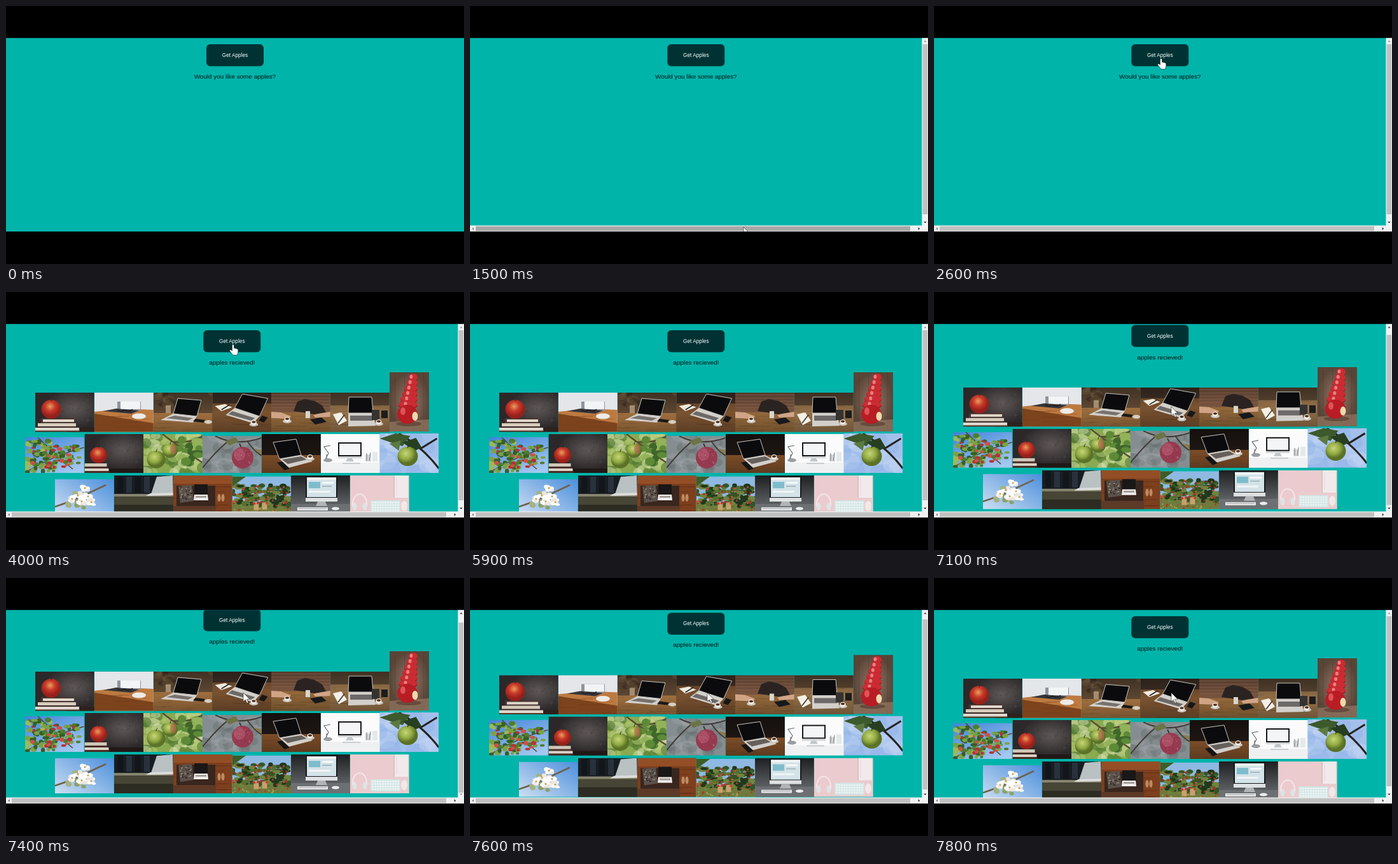
These frames come from a looping animation (720 px wide and 405 px high, 8 s). An HTML page:

```html
<!DOCTYPE html>
<html lang="en">
<head>
<meta charset="utf-8">
<title>Get Apples</title>
<style>
html, body { margin: 0; width: 100%; height: 100%; overflow: hidden; background: #000; }
#stage { display: block; width: 100vw; height: 100vh; }
text { font-family: "Liberation Sans", Arial, sans-serif; text-anchor: middle; }
</style>
</head>
<body>
<svg id="stage" viewBox="0 0 720 405">
  <defs>
    <linearGradient id="shade" x2="0" y2="1"><stop stop-opacity=".3"/><stop offset=".5" stop-opacity="0"/><stop offset="1" stop-opacity=".25"/></linearGradient>
    <linearGradient id="sky" x2=".6" y2="1"><stop stop-color="#3f84d8"/><stop offset="1" stop-color="#a4c8f0"/></linearGradient>
    <linearGradient id="haze" x1="1" x2="0" y2="1"><stop stop-color="#4c8fdc"/><stop offset="1" stop-color="#d3e3f3"/></linearGradient>
    <linearGradient id="studio" x2="0" y2="1"><stop stop-color="#1d1f21"/><stop offset="1" stop-color="#74777a"/></linearGradient>
    <radialGradient id="wall" cx=".65" cy=".4"><stop stop-color="#5f5857"/><stop offset="1" stop-color="#2c2829"/></radialGradient>
    <radialGradient id="boards"><stop stop-color="#94796a"/><stop offset="1" stop-color="#594537"/></radialGradient>
    <radialGradient id="red" cx=".45" cy=".35"><stop stop-color="#e7a05a"/><stop offset=".5" stop-color="#c93a2b"/><stop offset="1" stop-color="#96201a"/></radialGradient>
    <radialGradient id="green" cx=".4" cy=".35"><stop stop-color="#c6d578"/><stop offset=".6" stop-color="#93ab43"/><stop offset="1" stop-color="#5b7228"/></radialGradient>
  </defs>
  <svg y="50.3" width="720" height="303.7" viewBox="0 50.3 720 303.7">
    <rect y="50" width="720" height="304" fill="#00b4aa"/>
    <g id="doc">
      <g id="head">
        <rect x="315" y="60" width="90" height="34.5" rx="6" fill="#003234"/>
        <text x="360" y="79.8" font-size="8.27" fill="#fff">Get Apples</text>
        <text id="status" x="360" y="113.7" font-size="9.92" fill="#001512"></text>
      </g>
      <g id="photos"></g>
    </g>
    <g id="bars">
      <path d="M710.4 50H720V354H0V344.5H710.4Z" fill="#f1f1f1"/>
      <rect id="vThumb" x="711.6" width="7.6" height="267" fill="#c1c1c1"/>
      <rect id="hThumb" x="9" y="345.7" width="683" height="7.6"/>
      <path id="up" d="M713.3 56.5L715.5 54L717.7 56.5Z"/>
      <path id="down" d="M713.3 338.5L715.5 341L717.7 338.5Z"/>
      <path d="M5.7 347.3L3.2 349.5L5.7 351.7Z" fill="#777"/>
      <path d="M704.7 347.3L707.2 349.5L704.7 351.7Z" fill="#333"/>
    </g>
    <g id="cursor" fill="#fff" stroke="#222" stroke-width=".6" stroke-linejoin="round">
      <path id="hand" d="M0 1.5Q1.5-.7 3 1.5V6L8 7.2Q9.8 7.8 9.4 12L8 17H1.5L-4 10.3Q-3.2 8-1 9.3L0 10.3Z"/>
      <path id="arrow" d="M0 0V14L3.3 11L5.8 16.5L8 15.5L5.6 10.3H10Z"/>
    </g>
  </svg>
</svg>
<script>
const $ = id => document.getElementById(id);

// Drawing helpers, all returning SVG markup
const box = (x, y, w, h, fill) => `<rect x="${x}" y="${y}" width="${w}" height="${h}" fill="${fill}"/>`;
const oval = (x, y, rx, ry, fill) => `<ellipse cx="${x}" cy="${y}" rx="${rx}" ry="${ry}" fill="${fill}"/>`;
const poly = (points, fill) => `<polygon points="${points}" fill="${fill}"/>`;
const line = (d, color, w) => `<path d="${d}" fill="none" stroke="${color}" stroke-width="${w}"/>`;
const back = fill => box(0, 0, 93, 62, fill);
const shade = back('url(#shade)');
const repeat = (n, part) => Array.from({length: n}, (_, i) => part(i)).join('');

let seed = 7;
const rnd = (min, max) => {
  seed = seed * 16807 % 2147483647;
  return +(min + seed / 2147483647 * (max - min)).toFixed(1);
};
const dots = (n, x, y, w, h, r, ...colors) => repeat(n, i =>
  oval(rnd(x, x + w), rnd(y, y + h), rnd(r * .6, r * 1.4), rnd(r * .5, r), colors[i % colors.length]));
const grain = (y, h, color) => repeat(9, () => box(rnd(-20, 70), rnd(y, y + h), rnd(15, 50), .6, color));
const apple = (x, y, r, skin) => oval(x, y, r, r * .95, `url(#${skin})`) +
  line(`M${x} ${y - r * .8}q0 -3 2 -5`, '#33261a', 1);
const cup = (x, y) => oval(x, y + 3, 7, 3, '#c9c4bc') + oval(x, y, 4.5, 4, '#f0ece6') + oval(x, y - 1, 3, 1.8, '#4a2d1c');
const laptop = (screen, keys) => poly(keys, '#d3d0cb') +
  `<polygon points="${screen}" fill="#0b0b0d" stroke="#c9c6c1" stroke-width="1"/>`;
const desk = (wall, wood, y) => back(wall) + box(0, y, 93, 62, wood) + grain(y, 62 - y, '#3a22144d') + shade;
const speckle = dots(40, 0, 0, 93, 50, 2, '#77707014', '#221c1c22');

// Each photo: left, top, height, content, width if not the usual one
const photos = [
  [46, 158, 61.5, back('url(#wall)') + speckle +
    box(50, 55, 43, 8, '#2e211d') + box(9, 40, 51, 8, '#4a3530') + box(12, 42, 49, 4, '#e0d8cb') +
    box(4, 48, 60, 6, '#d5cbbc') + box(4, 53, 61, 2, '#352522') + box(0, 55, 69, 5, '#e0d8cd') + box(0, 59.5, 70, 2, '#5a3024') +
    apple(25, 26, 15.5, 'red')],
  [139, 158, 61.5, back('#e4e6ea') + poly('0,30 45,25 93,27 93,62 0,62', '#bd7a40') + poly('0,33 93,48 93,62 0,62', '#7c431d') +
    grain(32, 28, '#5a2e1466') + box(36, 14, 37, 14, '#8d949a') + box(41, 14, 31, 12, '#f2f4f6') +
    poly('14,29 34,25 70,28 58,33', '#353538') + line('M36 26q5 7 11 1q7 5 13 -1', '#1b1b1f', 1.2) + oval(70, 37, 11, 4.5, '#eeeae6')],
  [232, 158, 61.5, desk('#5c4632', '#a0703f', 32) + dots(12, 0, 0, 93, 20, 7, '#806a4a44', '#20140c55') +
    box(19, 20, 8, 12, '#d0bc9c99') + laptop('38,9 75,12 68,37 31,33', '31,33 68,37 62,47 11,43') +
    poly('20,40 33,36 62,40 54,44', '#77726d') + poly('66,41 81,43 78,47 62,45', '#1a1817') + oval(86, 46, 6, 3, '#d5cec3')],
  [324.5, 158, 61.5, desk('#3f2f25', '#7a5230', 17) + poly('4,21 20,18 31,23 14,29', '#efeadf') + line('M14 27L27 19', '#222', 1.5) +
    laptop('47,2 87,9 74,37 35,24', '35,24 74,37 64,48 21,35') + poly('31,29 67,40 61,44 25,34', '#6d6966') +
    poly('78,36 87,39 81,47 73,44', '#171717') + cup(65, 47)],
  [417, 158, 61.5, desk('#7a5540', '#93693b', 31) + repeat(5, i => box(0, 3 + i * 5, 93, .7, '#b58b6c66')) +
    poly('35,29 41,14 53,10 68,13 80,20 86,31 68,34 50,31', '#2a2321') + poly('0,30 15,31 31,37 28,41 0,40', '#d0a384') +
    poly('93,30 75,33 66,35 69,39 93,38', '#d0a488') + poly('61,42 79,39 87,46 69,50', '#17191c') + box(54, 29, 7, 11, '#d9d5cb') + cup(25, 42)],
  [510, 158, 61.5, desk('#5a4531', '#937048', 20) + laptop('29,7 65,7 67,32 28,32', '28,32 67,32 71,52 28,53') +
    poly('31,36 65,36 67,44 31,44', '#6c6a68') + poly('4,34 17,31 26,44 13,51', '#f3efe6') + line('M12 48L22 35', '#29251f', 1.4) +
    box(65, 27, 12, 16, '#343332') + box(80, 28, 10, 12, '#1d1c1c') + cup(76, 46)],
  [603, 126, 93, box(0, 0, 62, 93, 'url(#boards)') + repeat(4, i => box(8 + i * 15, 0, .7, 93, '#49372c77')) +
    poly('0,78 62,74 62,93 0,93', '#a88a7088') + oval(30, 81, 20, 4, '#4a312a88') +
    repeat(6, i => oval(37 - i * 1.6, 9 + i * 8.5, 7 + i * 1.6, 7, '#951620') +
      oval(37 - i * 1.6, 8 + i * 8.5, 7 + i * 1.6, 6, '#cb2c33') + oval(34 - i * 1.8, 7 + i * 8.5, 2.5, 3, '#e9807f')) +
    oval(28, 66, 16, 15, '#b81d25') + oval(21, 61, 4, 6, '#df5358') + oval(40, 69, 4.5, 7, '#efd9ac'), 62],

  [30, 228, 56, back('url(#sky)') + line('M0 56Q40 30 93 16M20 0Q45 25 75 50', '#5b4230', 1.5) +
    dots(75, 2, 5, 45, 50, 4, '#4d7d2e', '#7ba345', '#365f26', '#9cb95c') + dots(40, 40, 12, 45, 32, 3.5, '#4d7d2e', '#7ba345', '#365f26') +
    dots(20, 10, 14, 70, 34, 3.4, '#b83239', '#cf5049')],
  [123.5, 223, 61, back('url(#wall)') + speckle + box(35, 54, 58, 8, '#211816') +
    box(0, 46, 35, 6, '#d0c6b7') + box(0, 51, 36, 3, '#4a302a') + box(0, 54, 38, 5, '#dcd3c6') + box(0, 58, 39, 3, '#4d2922') + apple(22, 33, 13.5, 'red')],
  [216, 223, 61, back('#8aa950') + dots(60, 0, 0, 93, 62, 9, '#b4c97288', '#4f782f99', '#dce5bb77') +
    line('M30 0Q58 22 93 45M45 12Q75 15 93 3', '#594b34', 2.5) + dots(22, 52, 5, 40, 42, 7, '#5d8a37', '#93b259', '#3f672a') +
    apple(42, 26, 12, 'green') + oval(47, 24, 5, 8, '#b9614f99') + apple(20, 40, 14.5, 'green')],
  [309, 226, 58, back('#858d90') + dots(30, 0, 0, 93, 58, 10, '#a8aeb044', '#5b656455') +
    line('M20 0Q52 17 93 3M58 12L64 24M70 8Q82 25 93 31M0 50Q20 25 38 10', '#403a37', 2) +
    poly('35,8 52,2 57,9 42,15', '#6c7448') + poly('80,20 93,22 93,30', '#8a7a4c') + oval(63, 34, 17, 17, '#963a50') + oval(58, 29, 9, 10, '#b9647988') +
    dots(40, 51, 22, 24, 25, .8, '#d7929a88', '#6d1e3888')],
  [402, 223, 61, desk('#1d1613', '#7d4e29', 33) + laptop('18,13 54,8 62,33 28,39', '28,39 62,33 80,43 42,53') +
    poly('32,40 62,35 71,40 41,47', '#65605b') + poly('24,45 32,43 44,54 36,57', '#161515') + cup(76, 36)],
  [495, 223, 61, back('#fbfbfb') + box(0, 45, 93, 16, '#eff0f1') + box(27, 13, 37, 22, '#18191b') + box(29, 15, 33, 18, '#f4f5f6') +
    box(27, 35, 37, 3, '#d3d6d8') + poly('42,38 49,38 52,43 39,43', '#c3c7c9') + box(34, 45, 28, 2, '#c9cdcf') +
    line('M6 42L12 30L5 20L15 18M9 42V32', '#6a6d70', 1.2) + oval(11, 41, 7, 3, '#9a9ea1') + box(70, 32, 9, 11, '#d5d9da') + box(81, 28, 8, 15, '#e6e9ea') + line('M72 42V30M76 42L78 29', '#777', 1)],
  [587.5, 222, 62, back('#a3c0ec') + dots(18, 0, 0, 93, 62, 15, '#ccdaf355', '#86abe455') +
    line('M30 0Q50 12 65 25T93 55M64 24L90 8', '#25221e', 3) + poly('0,8 25,0 48,4 36,20 17,14', '#3c5a2c') +
    poly('36,14 57,7 66,22 54,28', '#263f21') + poly('15,16 33,11 30,27', '#5c7a40') + apple(44, 36, 16, 'green')],

  [77, 294, 55, back('url(#haze)') + line('M0 43Q25 35 48 24T80 9', '#70614b', 2.5) +
    dots(12, 14, 19, 44, 26, 4, '#8ca06a', '#a5b283') + [[47, 14], [36, 25], [52, 27], [27, 31], [57, 36], [42, 35]].map(([x, y]) =>
      dots(9, x - 5, y - 4, 10, 8, 3.6, '#fff', '#ece6e0') + oval(x, y, 1.7, 1.4, '#c6a65d')).join('')],
  [170, 288, 61, back('#181d22') + repeat(4, i => box(5 + i * 14, 2, 9, 25, i % 2 ? '#27323c' : '#12161a')) +
    box(0, 30, 93, 31, '#474535') + box(0, 29, 93, 4, '#86846f') + box(0, 46, 93, 16, '#2d2c22') + poly('67,2 92,0 93,28 58,29', '#b9c1c3') + poly('57,28 93,27 93,31 50,32', '#dcdddb')],
  [263, 288, 61, back('#7d3f1e') + box(0, 0, 93, 13, '#944e25') + grain(0, 60, '#3d190d88') + box(5, 16, 61, 39, '#39261e') + box(0, 48, 67, 14, '#5d3927') +
    poly('8,17 29,15 32,40 11,43', '#5b514b') + dots(28, 11, 18, 18, 20, 1.2, '#988c7c', '#29211f') +
    box(33, 14, 21, 16, '#191717') + poly('33,30 54,30 55,39 32,39', '#f0edea') + box(35, 32, 17, 3, '#a5a09b') + oval(72, 35, 2.5, 6, '#c08a62') + oval(78, 35, 2.5, 6, '#c08a62')],
  [355.5, 289.5, 59.5, back('#8fb9e2') + box(0, 43, 93, 18, '#6f7a3c') + dots(120, 0, 14, 93, 33, 4.5, '#345426', '#58702f', '#22371b', '#6f843d') +
    poly('0,16 22,0 0,0', '#3f5d29') + dots(45, 2, 14, 88, 34, 1.6, '#b9292a', '#d5493b') + box(34, 41, 8, 12, '#c9a06a') + box(47, 41, 8, 11, '#c9a06e') +
    dots(15, 33, 40, 22, 3, 1.5, '#c53934') + dots(24, 0, 50, 93, 9, 1.6, '#a83b2d', '#a4a04f')],
  [448, 288, 61, back('url(#studio)') + box(0, 45, 93, 17, '#6d7073') + box(23, 1, 50, 36, '#17191b') +
    box(25, 3, 46, 31, '#d3e3e8') + box(25, 3, 46, 4, '#f0f3f4') + box(28, 10, 18, 10, '#7fbccb') + box(49, 10, 18, 3, '#f7f8f8') +
    box(49, 16, 15, 2, '#a9bac2') + box(28, 24, 34, 3, '#f0f4f5') + box(23, 35, 50, 6, '#dfe1e2') + poly('42,41 54,41 57,48 39,48', '#b1b4b6') +
    box(10, 50, 48, 5, '#e4e5e5') + line('M12 52H56', '#a2a5a7', 1) + oval(70, 52, 6, 2.6, '#ececec')],
  [541, 288, 61, back('#ebcbce') + box(70, 0, 21, 35, '#f2eaea') + box(68, 1, 2, 34, '#d8c3c6') + line('M73 4V31', '#dcd6d7', 1) +
    line('M4 48C2 23 28 23 26 48', '#f4e6e6', 2) + oval(7, 49, 3.5, 6, '#dde4e4') + oval(23, 49, 3.5, 6, '#dde4e4') + box(32, 39, 47, 19, '#d2e5e5') +
    repeat(44, i => box(34 + i % 11 * 4, 41 + (i / 11 | 0) * 4, 3, 2.8, '#eaf3f2')) + oval(85, 48, 5, 8, '#f0e9e8')]
];
$('photos').innerHTML = photos.map(([x, y, h, art, w = 92.7]) =>
  `<svg x="${x}" y="${y}" width="${w}" height="${h}">${art}</svg>`).join('');

const clamp = v => Math.max(0, Math.min(1, v));
const ease = v => 1 - (1 - clamp(v)) ** 2;
const smooth = v => { v = clamp(v); return v * v * (3 - 2 * v); };
const show = (id, on) => $(id).style.display = on ? '' : 'none';
const mix = (a, b, v) => a + (b - a) * v;

function pointer(t) {
  if (t < 6600) {
    const v = ease((t - 1500) / 1100);
    return [mix(430, 355.5, v), mix(347, 82, v)];
  }
  const v = t < 6700 ? .5 : 1;
  return [mix(355.5, 373, v), mix(82, 180, v)];
}

function draw(now) {
  const t = Math.floor(now % 8000 / 100) * 100;
  const ready = t >= 3900;
  const scroll = 11 * (smooth((t - 6900) / 300) - smooth((t - 7400) / 400));
  const [x, y] = pointer(t);
  const overButton = x > 310 && x < 400 && y < 94.5;

  show('bars', t >= 100);
  show('photos', ready);
  $('head').setAttribute('transform', `translate(${t < 100 ? 0 : -4.7})`);
  $('status').textContent = ready ? 'apples recieved!' : 'Would you like some apples?';
  $('doc').setAttribute('transform', `translate(0 ${-scroll})`);

  $('vThumb').setAttribute('y', 60 + scroll * .9);
  $('hThumb').setAttribute('fill', t === 1500 ? '#a8a8a8' : '#c1c1c1');
  $('up').setAttribute('fill', scroll > 0 ? '#444' : '#999');
  $('down').setAttribute('fill', scroll < 11 ? '#333' : '#999');

  show('cursor', t >= 1500 && (t < 5900 || t >= 6100));
  show('hand', overButton);
  show('arrow', !overButton);
  $('cursor').setAttribute('transform', `translate(${x} ${y})`);
}

let start;
function tick(now) {
  start ??= now;
  draw(now - start);
  requestAnimationFrame(tick);
}
draw(0);
requestAnimationFrame(tick);
</script>
</body>
</html>
```
